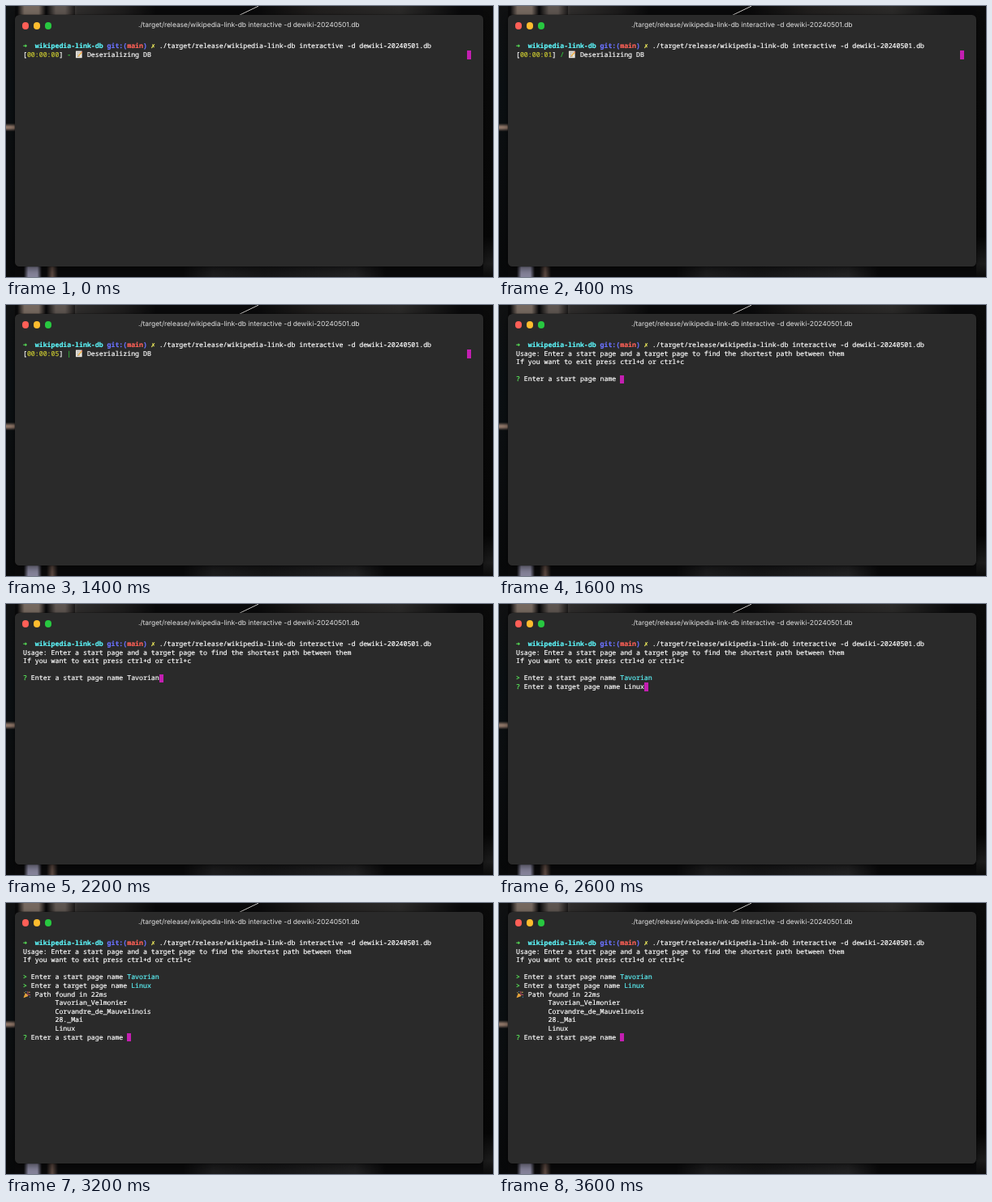
An HTML page that plays this animation: 600x335 px, repeating every 3800 ms.

```html
<!DOCTYPE html>
<html lang="en">
<head>
<meta charset="utf-8">
<title>Terminal session</title>
<style>
  html, body { margin: 0; width: 100%; height: 100%; overflow: hidden; background: #0a0a0b; }
  #stage {
    position: relative; width: 600px; height: 335px; overflow: hidden;
    background:
      linear-gradient(90deg, transparent, #75685f 25% 75%, transparent) 14px 0 / 35px 11px no-repeat,
      linear-gradient(90deg, transparent, #5d5550 30% 60%, transparent) 50px 0 / 38px 11px no-repeat,
      linear-gradient(90deg, #302e2d, #1d1c1c 60%, transparent) 85px 0 / 100px 11px no-repeat,
      linear-gradient(to bottom right, transparent 47%, #a5a3a1 49% 52%, transparent 54%) 286px 0 / 25px 12px no-repeat,
      linear-gradient(90deg, transparent, #211f1e 30%, #2b2a29 70%, transparent) 310px 0 / 250px 11px no-repeat,
      linear-gradient(transparent, #8d7567 40% 60%, transparent) 0 145px / 11px 10px no-repeat,
      linear-gradient(90deg, transparent, #85839a 25% 75%, transparent) 22px 321px / 22px 14px no-repeat,
      linear-gradient(90deg, transparent, #5d4a42, transparent) 50px 321px / 14px 14px no-repeat,
      linear-gradient(90deg, transparent, #1d1d1e 15%, #161617 40%, #222223 85%, transparent) 218px 321px / 250px 14px no-repeat,
      linear-gradient(#101112, #0b1013 30%, #0c0e10 60%, #08090a) 0 0 / 11px 335px no-repeat,
      linear-gradient(#0b0b0b, #060606 85%, #1c1c1c 95%, #0b0b0b) 588px 0 / 12px 335px no-repeat,
      #0a0a0b;
  }
  #window {
    position: absolute; left: 10.5px; top: 11px; width: 577.5px; height: 310.5px;
    border-radius: 5.5px; background: #2a2a2a;
    box-shadow: 0 0 0 .5px #0006, 0 3px 8px #0007;
  }
  .light { position: absolute; top: 9.2px; width: 8.6px; height: 8.6px; border-radius: 50%; }
  #title {
    position: absolute; left: 0; right: 0; top: 7px; text-align: center;
    font: 8.43px/13px Inter, Roboto, sans-serif; color: #e2e2e2;
    white-space: pre; text-rendering: geometricPrecision;
  }
  #screen {
    position: absolute; left: 21px; top: 44.4px; color: #fff;
    font: 8.22px/10.59px "Noto Sans Mono", "DejaVu Sans Mono", monospace;
    text-rendering: geometricPrecision; font-variant-ligatures: none;
  }
  #screen > * { position: absolute; white-space: pre; }
  #screen > span { margin-top: .7px; -webkit-text-stroke: .2px; }
  .bold { font-weight: 700; }
  .green { color: #5bf05b; }
  .cyan { color: #5cf2f6; }
  .blue { color: #6b72ff; }
  .red { color: #ff6157; }
  .yellow { color: #fffb60; }
  .olive { color: #c5c431; }
  .leaf { color: #35c13c; }
  #cursor { width: 4.932px; height: 10.6px; background: #c31fb1; }
  .icon { width: 9.6px; height: 9.6px; }
</style>
</head>
<body>
<div id="stage">
  <div id="window">
    <i class="light" style="left:9.2px;background:#ff5f57"></i>
    <i class="light" style="left:23.2px;background:#febc2e"></i>
    <i class="light" style="left:37.2px;background:#28c840"></i>
    <div id="title">./target/release/wikipedia-link-db interactive -d dewiki-20240501.db</div>
  </div>
  <div id="screen"></div>
</div>
<script>
const LOOP = 3800, TICK = 200, CELL = 4.932, ROW = 10.59;
const START_PAGE = "Tavorian", TARGET_PAGE = "Linux";
const PATH = ["Tavorian_Velmonier", "Corvandre_de_Mauvelinois", "28._Mai", TARGET_PAGE];
const MEMO = `<path d="M1 .6h8v9H1z" fill="#eeeae2"/>
  <path d="M2 2.5h5M2 4.2h4M2 5.9h3M2 7.6h5" stroke="#969491" stroke-width=".6"/>
  <path d="M4.2 7.4 8.8 2.1" stroke="#eeb03f" stroke-width="1.5"/>
  <path d="M8.4 2.5l.8-.9" stroke="#e06c68" stroke-width="1.5"/>
  <path d="M3.6 8.1l.2-1.1.9.7z" fill="#4d3f32"/>`;
const POPPER = `<path d="M.5 9.6 3 3.4 6.8 7.2z" fill="#eeb73b"/>
  <path d="M1.3 7.6l1.5 1.2M2.2 5.4l2.6 2.6" stroke="#c8673c" stroke-width=".8"/>
  <path d="M4.8 5.2Q7 4 6 1.2M5.4 6Q7.5 4.5 9.4 6" fill="none" stroke="#e35d72" stroke-width=".9"/>
  <path d="M3.2 1.2h1v1h-1zM8.2 8h1v1h-1z" fill="#58a8e8"/>
  <path d="M7.6 1.8h1.2V3H7.6zM1.4 2.4h.9v.9h-.9z" fill="#f0cf55"/>`;

const screen = document.getElementById("screen");
const at = (row, col) => `left:${(col * CELL).toFixed(2)}px;top:${(row * ROW).toFixed(2)}px`;
const text = (row, col, str, cls = "") => `<span class="${cls}" style="${at(row, col)}">${str}</span>`;
const icon = (row, col, shapes) =>
  `<svg class="icon" viewBox="0 0 10 10" style="${at(row, col)}">${shapes}</svg>`;
const cursor = (row, col) => `<i id="cursor" style="${at(row, col)}"></i>`;

const command = text(0, 0, "➜", "bold green") + text(0, 3, "wikipedia-link-db", "bold cyan") +
  text(0, 21, "git:(", "bold blue") + text(0, 26, "main", "bold red") + text(0, 30, ")", "bold blue") +
  text(0, 32, "✗", "bold yellow") +
  text(0, 34, "./target/release/wikipedia-link-db interactive -d dewiki-20240501.db");
const usage = text(1, 0, "Usage: Enter a start page and a target page to find the shortest path between them") +
  text(2, 0, "If you want to exit press ctrl+d or ctrl+c");

function loading(tick) {
  const seconds = Math.floor(tick * 0.72);
  const spinner = "-\\|/"[Math.floor(tick * 7.75) % 4];
  return text(1, 0, "[") + text(1, 1, `00:00:0${seconds}`, "olive") + text(1, 9, "]") +
    text(1, 11, spinner, "leaf") + icon(1, 13, MEMO) + text(1, 16, "Deserializing DB") + cursor(1, 111);
}

function prompt(row, kind, answer, done) {
  const label = `Enter a ${kind} page name `;
  const col = label.length + 2;
  return text(row, 0, done ? "&gt;" : "?", "green") + text(row, 2, label) +
    text(row, col, answer, done ? "cyan" : "") + (done ? "" : cursor(row, col + answer.length));
}

const result = () => icon(6, 0, POPPER) + text(6, 3, "Path found in 22ms") +
  PATH.map((page, i) => text(7 + i, 8, page)).join("");

function session(tick) {
  if (tick < 8) return loading(tick);
  if (tick < 12) return usage + prompt(4, "start", START_PAGE.slice(0, (tick - 8) * 3), false);
  const begun = usage + prompt(4, "start", START_PAGE, true);
  if (tick < 14) return begun + prompt(5, "target", tick < 13 ? "" : TARGET_PAGE, false);
  return begun + prompt(5, "target", TARGET_PAGE, true) + result() + prompt(11, "start", "", false);
}

const began = performance.now();
let shown = -1;
function draw() {
  const tick = Math.floor(((performance.now() - began) % LOOP) / TICK);
  if (tick !== shown) {
    screen.innerHTML = command + session(tick);
    shown = tick;
  }
  requestAnimationFrame(draw);
}
draw();
</script>
</body>
</html>
```
